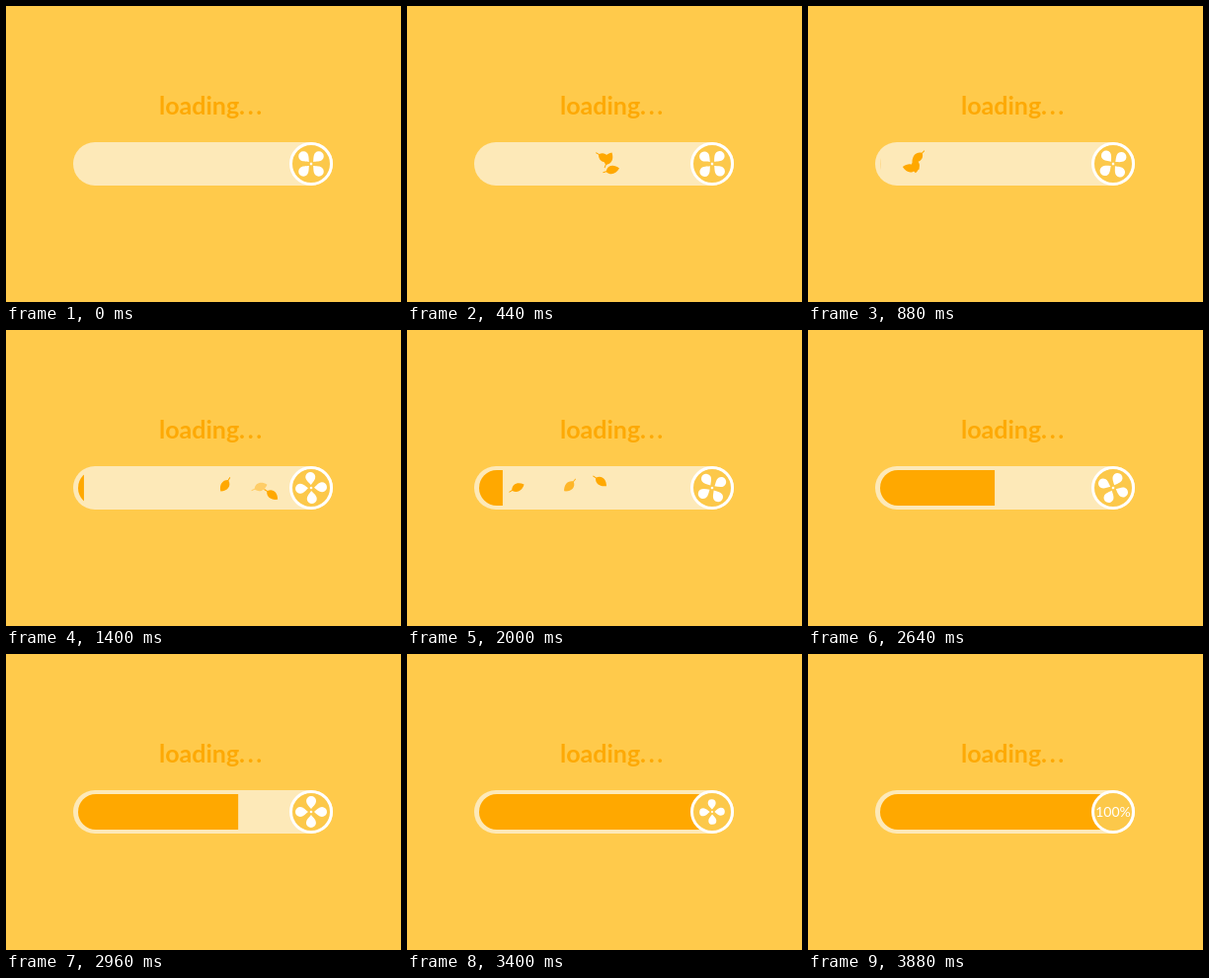
An HTML page that plays this animation: 400 by 300 pixels, repeating every 4000 ms.

```html
<!DOCTYPE html>
<html lang="en">
<head>
<meta charset="utf-8">
<title>Loading</title>
<style>
  html, body { margin: 0; width: 100%; height: 100%; overflow: hidden; background: #ffca4b; }
  svg { display: block; width: 400px; height: 300px; }
  text { font-family: Lato, sans-serif; }
</style>
</head>
<body>
<svg viewBox="0 0 400 300">
  <defs>
    <clipPath id="inner"><rect x="73" y="142" width="256" height="36" rx="18"/></clipPath>
    <path id="leaf" d="M-9 .4L-5.500 0C-3-5.500 3.500-5.500 8 0C3.500 5-2 5.500-5.500 1L-9 1.400Z"/>
    <path id="petal" d="M0-3C-2-5.500-5-8-5-11A5 5 0 0 1 5-11C5-8 2-5.500 0-3Z"/>
  </defs>
  <text x="155" y="110" font-size="25" font-weight="700" fill="#fda905">loading<tspan letter-spacing="2.6">...</tspan></text>
  <rect x="68" y="138" width="263" height="44" rx="22" fill="#fde9b8"/>
  <g clip-path="url(#inner)" fill="#ffa800">
    <g id="leaves"></g>
    <rect id="fill" x="73" y="142" height="36"/>
  </g>
  <circle cx="309" cy="160" r="20.500" fill="#fcc84a" stroke="#fff" stroke-width="3"/>
  <g id="fan" fill="#fff">
    <circle r="1.300"/>
    <use href="#petal"/>
    <use href="#petal" transform="rotate(90)"/>
    <use href="#petal" transform="rotate(180)"/>
    <use href="#petal" transform="rotate(270)"/>
  </g>
  <g id="done" fill="#fff"><text y="5" font-size="14" text-anchor="middle">100%</text></g>
</svg>
<script>
const LOOP = 4000, STEP = 40, END = 3880, LEAF_LIFE = 1050;
const $ = id => document.getElementById(id);
const clamp = v => Math.min(1, Math.max(0, v));
const ramp = (t, start, duration) => {
  const p = clamp((t - start) / duration);
  return p * p * (3 - 2 * p);
};
const place = (el, x, y, angle, scale = 1) =>
  el.setAttribute("transform", `translate(${x} ${y}) rotate(${angle}) scale(${scale})`);

// Leaves drift left at a steady pace, swaying once and spinning; angles are in degrees.
const leaves = [
  { start: 0, travel: 227, sway: 98, angle: -112, spin: 360 },
  { start: 20, travel: 226, sway: 75, angle: -205, spin: 360 },
  { start: 40, travel: 228, sway: -18, angle: -148, spin: 360 },
  { start: 1011, travel: 194, sway: -158, angle: -8, spin: 365 },
  { start: 1158, travel: 161, sway: -90, angle: 65, spin: -360, pale: true },
  { start: 1195, travel: 128, sway: 0, angle: -83, spin: 630 }
];
for (const leaf of leaves) {
  leaf.el = document.createElementNS("http://www.w3.org/2000/svg", "use");
  leaf.el.setAttribute("href", "#leaf");
  $("leaves").append(leaf.el);
}

function drawLeaf({ el, start, travel, sway, angle, spin, pale }, t) {
  const p = (t - start) / LEAF_LIFE;
  const y = 160 + 7 * Math.sin(2 * Math.PI * (p + sway / 360));
  place(el, 294 - travel * p, y, angle + spin * p);
  el.setAttribute("opacity", p <= 0 || p >= 1 ? 0 : pale ? .3 + .6 * p : 1);
}

function draw(t) {
  leaves.forEach(leaf => drawLeaf(leaf, t));

  // The bar creeps while it collects leaves, then fills quickly.
  const width = Math.max(0, .011 * (t - 860), .144 * (t - 1834));
  $("fill").setAttribute("width", Math.min(236, width));

  const fanAngle = 45 + .226 * t - 14 * Math.sin(2 * Math.PI * t / 3200);
  place($("fan"), 309, 160, fanAngle, 1 - ramp(t, 3320, 280));
  place($("done"), 309, 160, 0, ramp(t, 3480, 400));
}

function tick() {
  const t = performance.now() % LOOP;
  draw(Math.min(END, Math.floor(t / STEP) * STEP));
  requestAnimationFrame(tick);
}
tick();
</script>
</body>
</html>
```
